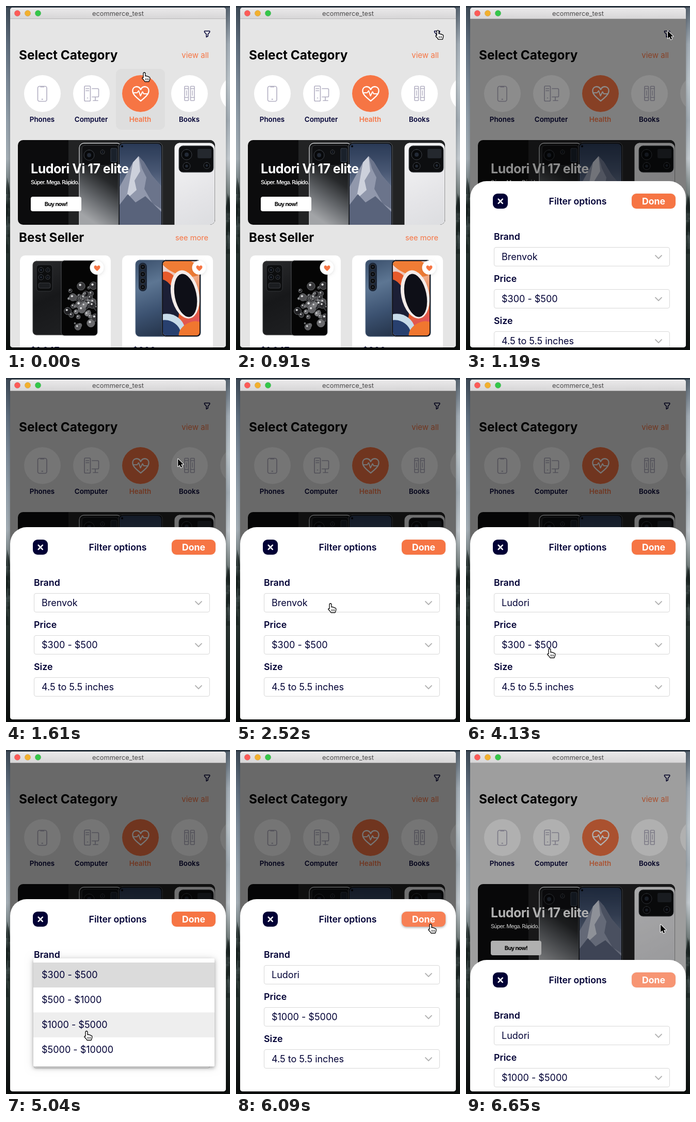
These frames come from a looping animation (434x662 px, 6.72 s). An HTML page with a canvas:

```html
<!DOCTYPE html>
<html lang="en">
<head>
<meta charset="utf-8">
<title>Shop filter</title>
<style>
html, body { margin: 0; width: 434px; height: 662px; overflow: hidden; background: #222; }
canvas { display: block; width: 434px; height: 662px; }
</style>
</head>
<body>
<canvas id="stage"></canvas>
<script>
const W = 434, H = 662, LOOP = 6720, STEP = 70;
const NAVY = '#010035', ORANGE = '#f67544', ICON = '#b4b1c3';
const canvas = document.getElementById('stage');
const dpr = window.devicePixelRatio || 1;
canvas.width = W * dpr;
canvas.height = H * dpr;
const c = canvas.getContext('2d');
c.scale(dpr, dpr);

const SHEET = { top: 287, bottom: 657, rise: 1056, drop: 6516.5 };
const MENU = { x: 53, y: 401, w: 351, h: 208, row: 48, pad: 8 };
const MENUS = [
  { open: 2640, close: 3420, pick: 1, options: ['Brenvok', 'Ludori', 'Tarmeq', 'Oskival'] },
  { open: 4140, close: 5090, pick: 2, options: ['$300 - $500', '$500 - $1000', '$1000 - $5000', '$5000 - $10000'] }
];
const CURSOR_KEYS = [
  [0, 268, 130], [560, 391, 50], [1190, 391, 48], [2400, 183, 436], [2940, 183, 436],
  [3300, 172, 482], [3640, 172, 482], [3850, 162, 523], [4480, 162, 523],
  [4760, 156, 543], [5320, 156, 543], [6090, 377, 337], [6440, 377, 337], [6650, 377, 336]
];
const HAND = new Path2D('M-2 8V0Q-2-2 0-2T2 0V5Q4 3.5 5 5.5Q7 4.5 8 6.5Q10.8 6 10.8 9Q10.8 12 9 15.5H1Q-1 12-4 9.5Q-4.5 7-2 8Z');
const ARROW = new Path2D('M0 0V14.5L3.4 11.4L5.6 16.5L8.2 15.4L6 10.4H10.6Z');
const HEART = new Path2D('M0 .9C-.5 .5-1 .1-1-.35C-1-.95-.25-1.05 0-.5C.25-1.05 1-.95 1-.35C1 .1 .5 .5 0 .9Z');

const clamp = v => Math.max(0, Math.min(1, v));
const mix = (a, b, p) => a + (b - a) * p;
const inside = (p, x, y, w, h) => p.x >= x && p.x <= x + w && p.y >= y && p.y <= y + h;

function randomFrom(seed) {
  return () => (seed = seed * 16807 % 2147483647) / 2147483647;
}
function bezier(x1, y1, x2, y2) {
  const at = (a, b, u) => 3 * (1 - u) * (1 - u) * u * a + 3 * (1 - u) * u * u * b + u * u * u;
  return x => {
    let lo = 0, hi = 1;
    for (let i = 0; i < 24; i++) {
      const mid = (lo + hi) / 2;
      if (at(x1, x2, mid) < x) lo = mid; else hi = mid;
    }
    return at(y1, y2, lo);
  };
}
const slideCurve = bezier(0, 0, 0.2, 1);
const fadeCurve = bezier(0.25, 0.1, 0.25, 1);

function gradient(x0, y0, x1, y1, colors) {
  const g = c.createLinearGradient(x0, y0, x1, y1);
  colors.forEach((col, i) => g.addColorStop(i / (colors.length - 1), col));
  return g;
}
function box(x, y, w, h, r, fill, stroke, lw = 1) {
  c.beginPath();
  c.roundRect(x, y, w, h, r);
  if (fill) { c.fillStyle = fill; c.fill(); }
  if (stroke) { c.strokeStyle = stroke; c.lineWidth = lw; c.stroke(); }
}
function disc(x, y, r, fill, stroke, lw = 1) {
  box(x - r, y - r, 2 * r, 2 * r, r, fill, stroke, lw);
}
function blob(x, y, rx, ry, rot, fill) {
  c.beginPath();
  c.ellipse(x, y, rx, ry, rot, 0, 7);
  c.fillStyle = fill;
  c.fill();
}
function shape(points, fill) {
  c.beginPath();
  points.forEach(p => c.lineTo(p[0], p[1]));
  c.closePath();
  c.fillStyle = fill;
  c.fill();
}
function stroke(d, color, lw) {
  c.strokeStyle = color;
  c.lineWidth = lw;
  c.lineCap = c.lineJoin = 'round';
  c.stroke(new Path2D(d));
}
function text(s, x, y, size, weight, color, align = 'left', spacing = 0) {
  c.font = `${weight} ${size}px Inter, sans-serif`;
  c.letterSpacing = spacing + 'px';
  c.textAlign = align;
  c.fillStyle = color;
  c.fillText(s, x, y);
}
function clipped(x, y, w, h, r, draw) {
  c.save();
  c.beginPath();
  c.roundRect(x, y, w, h, r);
  c.clip();
  draw();
  c.restore();
}
function shadow(color, blur, dy, draw) {
  c.save();
  c.shadowColor = color;
  c.shadowBlur = blur * dpr;
  c.shadowOffsetY = dy * dpr;
  draw();
  c.restore();
}
function heart(x, y, size, fill, line) {
  c.save();
  c.translate(x, y);
  c.scale(size, size);
  if (fill) { c.fillStyle = fill; c.fill(HEART); }
  if (line) { c.strokeStyle = line; c.lineWidth = 2.3 / size; c.stroke(HEART); }
  c.restore();
}

function cursorAt(t) {
  let i = 0;
  while (i < CURSOR_KEYS.length - 2 && t >= CURSOR_KEYS[i + 1][0]) i++;
  const a = CURSOR_KEYS[i], b = CURSOR_KEYS[i + 1];
  const p = clamp((t - a[0]) / (b[0] - a[0])), e = p * p * (3 - 2 * p);
  return { x: mix(a[1], b[1], e), y: mix(a[2], b[2], e) };
}
function sheetValue(t) {
  if (t < SHEET.drop) return clamp((t - SHEET.rise) / 250);
  return clamp(1 - (t - SHEET.drop) / 200);
}
const overDone = p => inside(p, 321, 311, 85, 29);
function isHand(t, p) {
  if (t < 1050) return inside(p, 213, 121, 95, 117) || inside(p, 374, 40, 32, 30);
  if (t >= SHEET.drop) return false;
  if (MENUS.some(m => t >= m.open && t < m.close)) return inside(p, MENU.x, 409, MENU.w, 192);
  return overDone(p) || [414, 495, 576].some(y => inside(p, 54, y, 341, 37));
}

function wallpaper() {
  c.fillStyle = gradient(0, 0, 0, H, ['#3d4956', '#5f6e7e', '#7d8b99', '#94a1ac', '#a5afb6', '#5d6967', '#2c3834', '#202b28', '#161d1b', '#0b0e0d']);
  c.fillRect(0, 0, W / 2, H);
  c.fillStyle = gradient(0, 0, 0, H, ['#55626f', '#a3adb6', '#bcc5cb', '#a3adb5', '#c5ccd1', '#6c7775', '#303c38', '#222d2a', '#181f1d', '#0b0e0d']);
  c.fillRect(W / 2, 0, W / 2, H);
  const rnd = randomFrom(5);
  for (let i = 0; i < 40; i++) {
    const x = (i % 2 ? 426 : 0) + rnd() * 8, y = 325 + rnd() * 130;
    shape([[x, y], [x + 4, y + 32], [x - 4, y + 32]], i % 3 ? 'rgba(24,34,31,.6)' : 'rgba(80,94,92,.3)');
  }
  c.fillStyle = '#2c3742';
  c.fillRect(0, 0, W, 3);
}

function titleBar() {
  box(8, 3, 418, 22, [5, 5, 0, 0], gradient(0, 3, 0, 25, ['#ebeaeb', '#d6d5d6']));
  c.fillStyle = '#b9b8b9';
  c.fillRect(8, 24, 418, 1);
  ['#fc5b57', '#f2b02f', '#35c64a'].forEach((col, i) => disc(22 + i * 20, 14, 5.7, col, 'rgba(0,0,0,.14)', 0.7));
  text('ecommerce_test', 217, 19, 12.8, 400, '#4b4a4b', 'center');
}

function categories(hover) {
  if (hover) box(213, 121, 95, 117, 10, '#dedede');
  ['Phones', 'Computer', 'Health', 'Books', ''].forEach((name, i) => {
    const x = 70.5 + i * 95, active = i === 2;
    disc(x, 168.5, 35.5, '#fff');
    if (active) disc(x, 168.5, 35.5, ORANGE);
    text(name, x - 0.5, 223, 13.4, 600, active ? ORANGE : NAVY, 'center');
  });
  box(61.5, 154.5, 17.5, 29, 3.5, null, ICON, 1.7);
  stroke('M67 155.5H73.5M69.5 179.5H71', ICON, 1.8);
  box(152, 154, 11.5, 29, 2, null, ICON, 1.7);
  stroke('M155 159H160.5M155 163H160.5M157.5 177H158.5M167 159H177.5Q179.5 159 179.5 161V173Q179.5 175 177.5 175H167M173 175V181M169 182H178', ICON, 1.7);
  [346, 357.5].forEach(x => {
    box(x, 154.5, 7.5, 27.5, 1, null, ICON, 1.6);
    stroke(`M${x} 159H${x + 7.5}M${x} 176H${x + 7.5}M${x + 3.7} 163V172`, ICON, 1.4);
  });
  heart(261, 168.7, 15.6, null, '#fff');
  stroke('M246.5 167H254L257 163L260.5 173L264.5 165L267 169H275', '#fff', 2);
}

function lens(x, y, r) {
  disc(x, y, r, '#08090b', '#3d4147', 1);
  disc(x, y, r * 0.4, '#232a36');
}

function banner() {
  clipped(23, 258, 382, 163, 10, () => {
    c.fillStyle = '#0c0c0d';
    c.fillRect(23, 258, 382, 163);
    c.fillStyle = '#222324';
    c.fillRect(121, 258, 284, 163);

    box(142, 264, 82, 180, 9, gradient(146, 400, 214, 300, ['#a2a4a7', '#63666a', '#27292b', '#101112']), '#d3d5d7', 1.3);
    box(147, 268, 71, 39, 6, '#0e0f11', '#3c3f43');
    lens(161, 287, 10);
    lens(187, 281, 4);
    box(203, 274, 12, 26, 2, '#1a212b', '#39414c');

    box(218, 263, 85, 180, 8, '#0a0b0d', '#5b6068');
    clipped(220, 265, 81, 170, 7, () => {
      c.fillStyle = gradient(0, 265, 0, 421, ['#2a3a56', '#475672', '#77829a', '#8f98ab']);
      c.fillRect(218, 263, 85, 160);
      shape([[218, 352], [230, 330], [246, 301], [257, 289], [267, 300], [282, 325], [303, 350], [303, 421], [218, 421]], '#9198ac');
      shape([[257, 289], [263, 312], [272, 330], [268, 352], [284, 380], [303, 392], [303, 350], [282, 325], [267, 300]], '#6b748b');
      shape([[246, 301], [257, 289], [260, 318], [249, 336], [253, 354], [233, 372], [238, 345]], '#cdd1dc');
      shape([[218, 385], [236, 362], [251, 378], [270, 366], [303, 398], [303, 421], [218, 421]], '#59637b');
    });
    disc(225, 270, 2, '#05070a');

    box(327, 264, 77, 180, 9, gradient(327, 264, 404, 421, ['#f7f7f8', '#ededef', '#e4e4e7', '#dcdde0']), '#fafafa');
    box(335, 269, 67, 51, 8, '#0d0e10', '#55585c');
    lens(350, 286, 10);
    lens(350, 308, 7);
    box(371, 275, 27, 18, 3, '#24282e');
    lens(389, 307, 6);
  });
  text('Ludori Vi 17 elite', 48, 322, 25, 700, '#fff', 'left', -0.5);
  text('Súper. Mega. Rápido.', 48, 343, 10.8, 500, '#fff', 'left', -0.85);
  box(48, 367, 98, 28, 4, '#fff');
  text('Buy now!', 97, 385, 11, 700, '#000', 'center', -0.7);
}

function bubblePhone() {
  box(52, 491, 67, 142, 7, gradient(52, 491, 118, 633, ['#2a2b2d', '#17181a', '#1f2022']), '#444');
  box(59, 498, 31, 51, 6, '#0c0d0e', '#34363a');
  [508, 522].forEach(y => { lens(68, y, 5); lens(81, y, 4); });
  box(63, 533, 23, 10, 3, '#1b1d20', '#3a3c40');
  box(107, 490, 70, 144, 6, '#050505', '#515356');
  const rnd = randomFrom(11);
  clipped(109, 492, 66, 140, 5, () => {
    for (let i = 0; i < 55; i++) {
      const a = rnd() * 6.283, d = rnd() * 48, r = 1.5 + rnd() * 6.5;
      const x = 151 + Math.cos(a) * d * 0.7, y = 577 + Math.sin(a) * d;
      const g = Math.round(25 + rnd() * 110);
      disc(x, y, r, `rgb(${g},${g},${g + 3})`, '#77797c', 0.8);
      disc(x - r * 0.25, y - r * 0.3, r * 0.3, '#d8d9da');
    }
  });
}

function swirlPhone() {
  box(251, 489, 62, 147, 8, gradient(251, 489, 304, 636, ['#3a4f6b', '#5d7693', '#3c5271', '#243349']), '#61748c');
  box(257, 494, 16, 55, 8, '#1b2637');
  [502, 516, 529, 541].forEach(y => lens(265, y, 5));
  box(302, 489, 75, 147, 7, '#0b0c10', '#4d5563');
  clipped(304, 491, 71, 143, 6, () => {
    c.fillStyle = gradient(304, 491, 375, 634, ['#e9e2ec', '#f3b08c', '#e8642f', '#d6408a']);
    c.fillRect(304, 491, 71, 143);
    blob(338, 500, 40, 17, 0.35, '#f07c35');
    blob(318, 560, 26, 50, -0.25, '#e65a2b');
    blob(310, 572, 23, 47, -0.25, '#1c1f36');
    blob(347, 555, 27, 47, -0.2, '#f4ece9');
    blob(348, 557, 21, 42, -0.2, '#0e0f17');
    blob(318, 617, 30, 23, 0.5, '#c8dbe9');
    blob(314, 625, 26, 19, 0.5, '#28406f');
    blob(359, 626, 26, 17, -0.5, '#f0762f');
  });
}

function products() {
  [[27, '$1,047'], [225, '$800']].forEach(([x, price], i) => {
    box(x, 480, 176, 220, 10, '#fff');
    if (i) swirlPhone(); else bubblePhone();
    shadow('rgba(0,0,0,.13)', 6, 1, () => disc(x + 149, 503.5, 13.5, '#fff'));
    heart(x + 149.5, 504.5, 6, ORANGE);
    text(price, x + 20, 669, 17, 700, NAVY);
  });
}

function home(hover) {
  c.fillStyle = '#e5e5e5';
  c.fillRect(8, 25, 418, 632);
  stroke('M384.5 48.3H394.7V50.2L391.3 54.2V58L388.2 59.8V54.2L384.5 50.2Z', NAVY, 1.5);
  text('Select Category', 25, 103, 24.4, 700, '#000');
  text('view all', 393, 100, 15, 400, ORANGE, 'right');
  categories(hover);
  banner();
  text('Best Seller', 25, 454, 24.2, 700, '#000');
  text('see more', 392, 451, 14.6, 400, ORANGE, 'right');
  products();
}

function doneButton(t, pointer) {
  const pressed = t >= 6440, hover = t >= 5320 && t < SHEET.drop && overDone(pointer);
  const face = pressed ? '#f79573' : hover ? '#f78055' : ORANGE;
  const draw = () => box(321, 24, 85, 29, 9, face);
  if (hover) shadow('rgba(0,0,0,.35)', 4, 1.5, draw);
  else shadow('rgba(0,0,0,.1)', 2, 0, draw);
  text('Done', 363.5, 45, 17.7, 700, '#fff', 'center');
}

function sheet(t, top, pointer) {
  c.save();
  c.translate(0, top);
  box(8, 0, 418, 400, [32, 32, 0, 0], '#fff');
  box(52, 24, 29, 29, 9, NAVY);
  stroke('M62.7 34.7L70.8 42.8M70.8 34.7L62.7 42.8', '#fff', 2.6);
  text('Filter options', 216.5, 45, 17.7, 600, NAVY, 'center');
  doneButton(t, pointer);
  const values = MENUS.map(m => m.options[t >= m.close ? m.pick : 0]);
  values.push('4.5 to 5.5 inches');
  ['Brand', 'Price', 'Size'].forEach((label, i) => {
    const y = 81 * i;
    text(label, 54, y + 113, 17.8, 600, NAVY);
    box(54.5, y + 127.5, 340, 36, 3.5, '#fff', '#d8d8d8');
    text(values[i], 69, y + 152, 18, 400, NAVY);
    stroke(`M367 ${y + 143}L373 ${y + 149}L379 ${y + 143}`, '#b3b3b3', 1.8);
  });
  c.restore();
}

function dropdown(menu, t, pointer) {
  if (t < menu.open || t >= menu.close + 75) return;
  const p = clamp((t - menu.open) / 300), grow = fadeCurve(clamp((p - 0.25) * 4));
  const alpha = t < menu.close ? clamp(p * 4) : 1 - (t - menu.close) / 75;
  const y0 = mix(MENU.y + MENU.pad, MENU.y, grow);
  const y1 = mix(MENU.y + MENU.pad + MENU.row, MENU.y + MENU.h, grow);
  c.globalAlpha = alpha;
  shadow('rgba(0,0,0,.14)', 16, 1, () => box(MENU.x, y0, MENU.w, y1 - y0, 2, '#fff'));
  shadow('rgba(0,0,0,.3)', 6, 3, () => box(MENU.x, y0, MENU.w, y1 - y0, 2, '#fff'));
  clipped(MENU.x, y0, MENU.w, y1 - y0, 2, () => {
    const over = Math.floor((pointer.y - MENU.y - MENU.pad) / MENU.row);
    menu.options.forEach((option, i) => {
      const y = MENU.y + MENU.pad + i * MENU.row, unit = 0.5 / (menu.options.length + 1.5);
      const start = Math.min(0.5 + (i + 1) * unit, 1 - 1.5 * unit);
      c.globalAlpha = alpha * (i ? clamp((p - start) / (1.5 * unit)) : 1);
      if (i === 0 || i === over) {
        c.fillStyle = i ? '#eeeeee' : '#dbdbdb';
        c.fillRect(MENU.x, y, MENU.w, MENU.row);
      }
      text(option, 69, y + 30, 18, 400, NAVY);
    });
  });
  c.globalAlpha = 1;
}

function pointerIcon(p, hand) {
  const path = hand ? HAND : ARROW;
  c.save();
  c.translate(p.x, p.y);
  c.lineJoin = 'round';
  c.strokeStyle = hand ? '#000' : '#fff';
  c.lineWidth = hand ? 1.3 : 2;
  c.fillStyle = hand ? '#fff' : '#000';
  if (!hand) c.stroke(path);
  c.fill(path);
  if (hand) {
    c.stroke(path);
    stroke('M2.5 9.5V12.5M5 9.5V12.5M7.5 9.5V12.5', '#000', 0.9);
  }
  c.restore();
}

function render(t) {
  const p = cursorAt(t), v = sheetValue(t);
  wallpaper();
  shadow('rgba(0,0,0,.3)', 6, 2, () => box(8, 3, 418, 654, 5, '#e5e5e5'));
  clipped(8, 3, 418, 654, 5, () => {
    home(t < 1050 && inside(p, 213, 121, 95, 117));
    if (v > 0) {
      c.fillStyle = `rgba(0,0,0,${0.54 * fadeCurve(v)})`;
      c.fillRect(8, 25, 418, 632);
      sheet(t, Math.round(mix(SHEET.bottom, SHEET.top, slideCurve(v))), p);
    }
    MENUS.forEach(m => dropdown(m, t, p));
  });
  titleBar();
  pointerIcon(p, isHand(t, p));
}

let shown = -1;
function tick() {
  const t = Math.floor(performance.now() % LOOP / STEP) * STEP;
  if (t !== shown) render(shown = t);
  requestAnimationFrame(tick);
}
tick();
</script>
</body>
</html>
```
